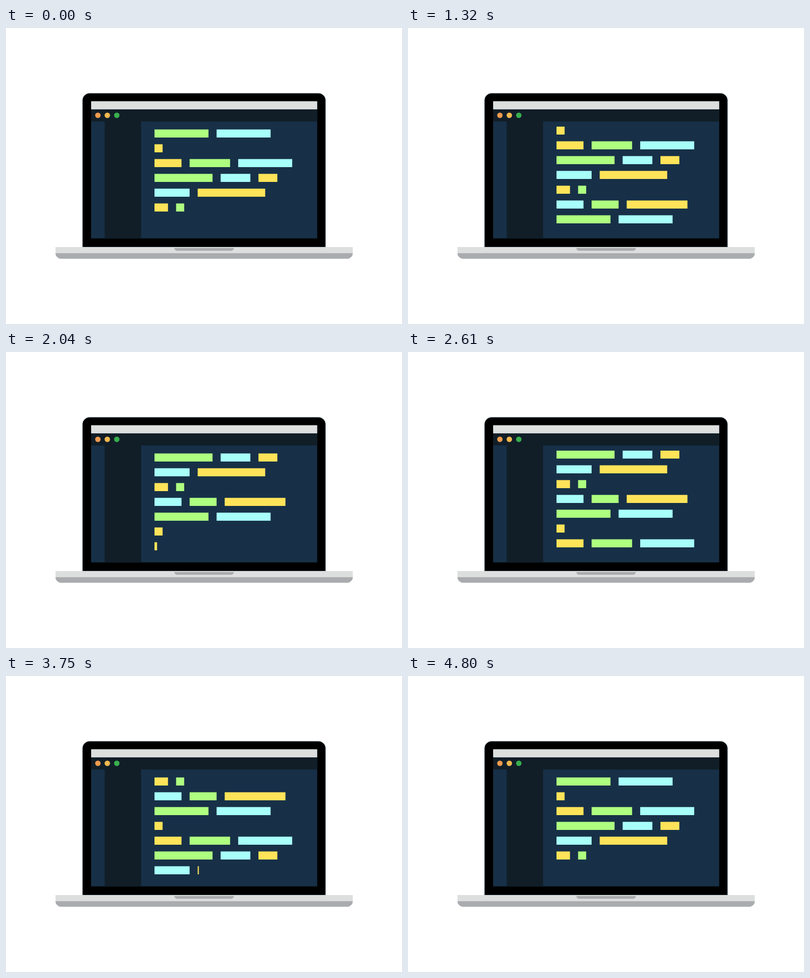
Write an HTML page that moves like this. It is 800 px wide and 600 px high and loops after 4830 ms.

```html
<!DOCTYPE html>
<html lang="en">
<head>
<meta charset="utf-8">
<title>Laptop typing code</title>
<style>
  html, body { margin: 0; width: 100%; height: 100%; overflow: hidden; background: #fff; }
  svg { display: block; width: 100vw; height: 100vh; }
</style>
</head>
<body>
<svg viewBox="0 0 800 600">
  <defs>
    <clipPath id="editor"><rect x="273" y="199.7" width="355" height="227"/></clipPath>
  </defs>
  <path d="M154.6 444V147a14.5 14.5 0 0 1 14.5-14.7H631a14.5 14.5 0 0 1 14.6 14.7V444Z" stroke="#6fa3b5" stroke-width=".4"/>
  <rect x="172" y="148.5" width="456.7" height="278" fill="#173047"/>
  <rect x="172" y="148.5" width="456.7" height="16.4" fill="#dcdfde"/>
  <path d="M172 164.9H628.7V189.4H273V426.5H199.3V189.4H172Z" fill="#111e28"/>
  <circle cx="185.6" cy="177" r="5.5" fill="#ee9a4e"/>
  <circle cx="204.7" cy="177" r="5.5" fill="#f3b74f"/>
  <circle cx="223.8" cy="177" r="5.5" fill="#38af4d"/>
  <g clip-path="url(#editor)"><g id="code"></g></g>
  <path d="M100 444H700.6V457H100Z" fill="#dcdfde"/>
  <path d="M100 456.4H700.6A12 11.4 0 0 1 688.6 467.8H112A12 11.4 0 0 1 100 456.4Z" fill="#a9abae"/>
  <path d="M340 446H460.4A6 5.6 0 0 1 454.4 451.6H346A6 5.6 0 0 1 340 446Z" fill="#a9abae"/>
</svg>
<script>
const LOOP = 4830, TICK = 30, GAP = 60, SCROLL = 150;
const UNIT = 60 / 11, LEFT = 300, TOP = 205.64, ROW = 30, BAR = 3 * UNIT;
const COLORS = { g: '#aeff80', c: '#a8fffa', y: '#ffe359' };

// Each word: colour, width in units. Words are 3 units apart.
const LINES = [
  'g20 c20', 'y3', 'y10 g15 c20', 'g21.5 c11 y7', 'c13 y25', 'y5 g3', 'c10 g10 y22.5'
].map(line => line.split(' ').map(w => ({ color: COLORS[w[0]], width: w.slice(1) * UNIT })));

const code = document.getElementById('code');
const words = [], scrolls = [];

function addRow(line, row, place) {
  let x = LEFT;
  for (const { color, width } of line) {
    const el = document.createElementNS('http://www.w3.org/2000/svg', 'rect');
    const attrs = { x, y: TOP + row * ROW, width, height: BAR, fill: color };
    for (const key in attrs) el.setAttribute(key, attrs[key]);
    code.append(el);
    if (place) place(el, width);
    x += width + BAR;
  }
}

// Six lines stand at the start, then all seven are typed in turn.
for (let i = 0; i < 6; i++) addRow(LINES[i], i);

let clock = 0;
for (let i = 6; i < 13; i++) {
  const line = LINES[i % 7];
  addRow(line, i, (el, width) => {
    const span = width > 100 ? 180 : 90;
    words.push({ el, width, start: clock, span });
    clock += span + GAP;
  });
  // Lines ending in a lone square rest longer.
  const rest = line[line.length - 1].width <= BAR ? 210 : 90;
  clock += rest - GAP;
  scrolls.push(clock);
  clock += SCROLL + GAP;
}

const progress = (t, start, span) => Math.min(1, Math.max(0, (t - start) / span));

// Strong symmetric ease: cubic-bezier(.83, 0, .17, 1), solved by bisection.
function ease(x) {
  if (x <= 0 || x >= 1) return x;
  let lo = 0, hi = 1;
  for (let i = 0; i < 24; i++) {
    const s = (lo + hi) / 2, r = 1 - s;
    const at = 2.49 * s * r * r + 0.51 * s * s * r + s * s * s;
    if (at < x) lo = s; else hi = s;
  }
  return lo * lo * (3 - 2 * lo);
}

function draw(t) {
  for (const w of words) w.el.setAttribute('width', w.width * ease(progress(t, w.start, w.span)));
  const rows = scrolls.reduce((sum, start) => sum + progress(t, start, SCROLL), 0);
  code.setAttribute('transform', `translate(0 ${-rows * ROW})`);
}

const begin = performance.now();
function tick() {
  const t = (performance.now() - begin) % LOOP;
  draw(Math.floor(t / TICK) * TICK);
  requestAnimationFrame(tick);
}
tick();
</script>
</body>
</html>
```
